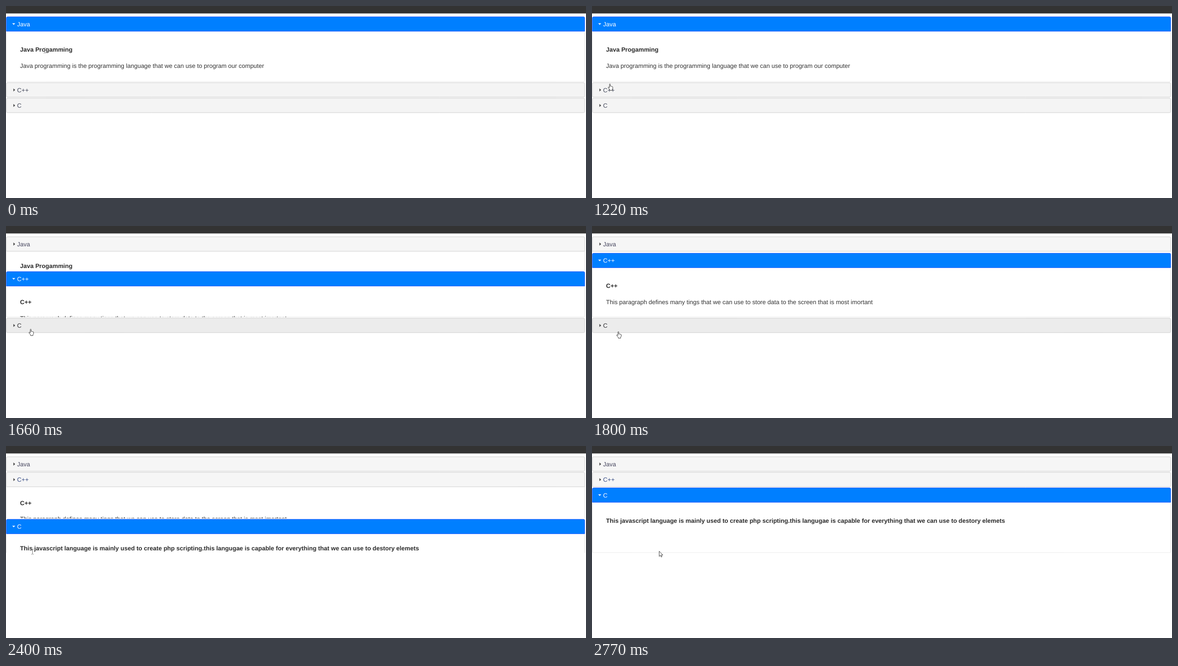
Animation, 1280 px wide and 425 px high, one loop 3120 ms. Source, as an HTML page with a canvas:

```html
<!DOCTYPE html>
<html lang="en">
<head>
<meta charset="utf-8">
<title>Accordion</title>
<style>
html, body { margin: 0; height: 100%; overflow: hidden; background: #fff; }
canvas { display: block; }
</style>
</head>
<body>
<canvas id="stage" width="1280" height="425"></canvas>
<script>
const ctx = document.getElementById('stage').getContext('2d');
const LOOP = 3120, LEFT = 0.5, WIDTH = 1277, TOP = 23.5;
const HEADER = 32.8, PITCH = 34.4, PANEL = 111.4, PADDING = 13.44, BORDER = 0.84;
const FONT = '13.44px Arial, "Liberation Sans", sans-serif';

const sections = [
  { title: 'Java', color: '#47475f', heading: 'Java Progamming',
    text: 'Java programming is the programming language that we can use to program our computer' },
  { title: 'C++', color: '#454a5c', heading: 'C++',
    text: 'This paragraph defines many tings that we can use to store data to the screen that is most imortant' },
  { title: 'C', color: '#454a5c', text: '',
    heading: 'This javascript language is mainly used to create php scripting.this langugae is capable for everything that we can use to destory elemets' }
];

const cursors = {
  beam: new Path2D('M-2.5-5.5H-.6M.6-5.5H2.5M0-5V5M-2.5 5.5H-.6M.6 5.5H2.5'),
  arrow: new Path2D('M0 0V11.6L2.7 9.2L4.5 13L6.3 12.2L4.6 8.5H8Z'),
  hand: new Path2D('M3.5 8.8V1.6Q3.5.5 4.5.5T5.5 1.6V5.6Q7 4.8 7.4 5.9Q8.9 5.2 9.2 6.4Q10.8 6 10.8 7.6V10.5L9.5 12.8V14.8H4.3V13.2L.7 8.8Q.4 7.4 1.6 7.4Z')
};

// Screen updates: time, pointer shape, pointer position
const steps = [
  [0, 'beam', 85.5, 98.5], [400, 'beam', 80, 102], [470, 'arrow', 62, 112],
  [540, 'arrow', 38, 128], [610, 'arrow', 14, 143], [680, 'arrow', 1, 153],
  [750, 'arrow', 9, 158.5], [820, 'arrow', 16, 167], [880, 'hand', 24, 175],
  [950, 'hand', 33, 184], [1020, 'hand', 25, 177], [1220, 'hand', 35, 172],
  [1480, 'hand', 32.5, 181.5], [1520, 'hand', 36, 190], [1590, 'hand', 45, 213],
  [1660, 'hand', 50, 227.8], [1730, 'hand', 53, 232], [1800, 'hand', 53.7, 233.5],
  [2330, 'beam', 58.5, 234], [2400, 'beam', 58.5, 234], [2470, 'beam', 58.5, 234],
  [2540, 'beam', 58.5, 234], [2770, 'arrow', 148.3, 232.8]
];
const holds = [1870, 2000, 2260];

const clamp = v => Math.min(1, Math.max(0, v));
const swing = p => 0.5 - Math.cos(clamp(p) * Math.PI) / 2;

function label(text, x, y, color, weight = '') {
  ctx.font = weight + ' ' + FONT;
  ctx.fillStyle = color;
  ctx.fillText(text, x, y);
}

function box(y, height, radii, fill, stroke) {
  ctx.beginPath();
  ctx.roundRect(LEFT + BORDER / 2, y + BORDER / 2, WIDTH - BORDER, height - BORDER, radii);
  ctx.fillStyle = fill;
  ctx.fill();
  ctx.strokeStyle = stroke;
  ctx.lineWidth = BORDER;
  ctx.stroke();
}

function triangle(y, open, color) {
  ctx.fillStyle = color;
  ctx.fill(new Path2D(open
    ? `M13.7 ${y + 14.7}h6.6l-3.3 3.5z`
    : `M16.4 ${y + 13.1}v6.8l3.7-3.4z`));
}

function drawHeader(section, y, active, hover, expanded, light) {
  const bottom = expanded ? 0 : 2.5;
  const fill = active ? '#007fff' : hover ? '#ececec' : light ? '#f6f6f6' : '#f4f4f4';
  const color = active ? '#fff' : hover ? '#2f2f33' : section.color;
  box(y, HEADER, [2.5, 2.5, bottom, bottom], fill, active ? '#003eff' : '#c5c5c5');
  triangle(y, active, active ? '#fff' : '#444');
  label(section.title, 24.6, y + 21.2, color);
}

function drawPanel(section, y, share, edge) {
  const height = PANEL * share;
  if (height < 0.5) return;
  ctx.save();
  ctx.beginPath();
  ctx.rect(0, y, 1280, height);
  ctx.clip();
  box(y - 4, height + (edge ? 4 : 10), [0, 0, 2.5, 2.5], '#fff', '#ddd');
  const shift = y - PADDING * (1 - share);
  label(section.heading, 31, shift + 45, '#2b2b2b', 'bold');
  label(section.text, 31, shift + 80.4, '#333');
  ctx.restore();
}

function drawCursor(shape, x, y) {
  ctx.save();
  ctx.translate(x, y);
  ctx.lineWidth = 0.9;
  ctx.strokeStyle = shape === 'beam' ? '#666' : '#222';
  ctx.fillStyle = '#fff';
  if (shape !== 'beam') ctx.fill(cursors[shape]);
  ctx.stroke(cursors[shape]);
  ctx.restore();
}

function draw(now) {
  const clock = now % LOOP;
  const [stepTime, shape, x, y] = steps.findLast(s => s[0] <= clock);
  const t = Math.max(stepTime, ...holds.filter(h => h <= clock));
  const active = t < 1480 ? 0 : t < 2260 ? 1 : 2;
  const first = swing(Math.pow(clamp((t - 1470) / 367), 0.84));
  const second = swing((t - 2232) / 400);
  const shares = [1 - first, first - second, second];
  const edges = [first === 0, second === 0, second === 1];

  ctx.fillStyle = '#fff';
  ctx.fillRect(0, 0, 1280, 425);
  ctx.fillStyle = '#333';
  ctx.fillRect(0, 0, 1280, 16.5);
  sections[1].color = active === 2 ? '#3a4f86' : '#454a5c';

  let top = TOP;
  sections.forEach((section, i) => {
    const hover = i === 2 && active === 1 && t >= 1590;
    drawPanel(section, top + HEADER, shares[i], edges[i]);
    drawHeader(section, top, i === active, hover, shares[i] > 0, i < active);
    top += PITCH + PANEL * shares[i];
  });
  drawCursor(shape, x, y);
}

ctx.textRendering = 'geometricPrecision';
const start = performance.now();
(function tick() {
  draw(performance.now() - start);
  requestAnimationFrame(tick);
})();
</script>
</body>
</html>
```
